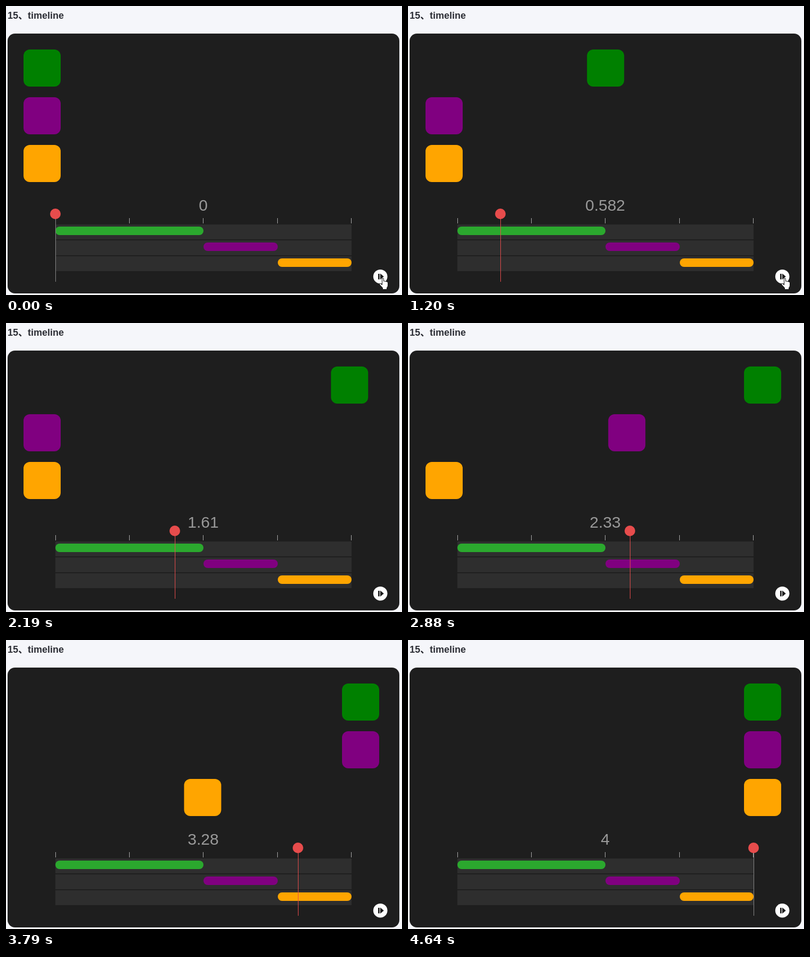
An HTML page for the animation above (4900 ms loop, 746 by 545 pixels).

```html
<!DOCTYPE html>
<html lang="en">
<head>
<meta charset="utf-8">
<title>timeline</title>
<style>
  html, body { margin: 0; width: 100%; height: 100%; overflow: hidden; background: #f5f6fa; }
  svg { display: block; }
  text { font-family: "Liberation Sans", Arial, "Noto Sans CJK SC", "Noto Sans CJK", sans-serif; }
  .title { font-size: 18px; font-weight: bold; fill: #2c2e35; }
  .count { font-size: 30px; fill: #999; text-anchor: middle; }
</style>
</head>
<body>
<svg width="746" height="545" viewBox="0 0 746 545">
  <rect width="746" height="545" fill="#f5f6fa"/>
  <text class="title" x="3" y="24">15、timeline</text>
  <rect x="3" y="52" width="738" height="490" rx="14" fill="#1e1e1e"/>
  <g id="tracks"></g>
  <g id="boxes"></g>
  <text class="count" id="count" x="371.5" y="386">0</text>
  <g id="head">
    <rect id="line" y="392" width="1" height="128"/>
    <circle cy="392" r="10" fill="#e74c4c"/>
  </g>
  <g>
    <circle cx="705.2" cy="510.2" r="13.3" fill="#fff"/>
    <path d="M701 505h2.800v10.500H701zM705 504.600l6.800 5.600-6.800 5.700z" fill="#1e1e1e"/>
  </g>
  <g id="hand">
    <path transform="translate(703 513)" fill="#fff" stroke="#111" stroke-linejoin="round"
      d="M5.500 13V2Q5.500 .5 7 .5T8.500 2V6q1.500-1 3 .5 1.500-.7 3 .6 2-.4 2 1.900V14q0 2-2 4.500V21.500H6.500V18.500L1 12.500q-1-2 .5-2.500 1.500 0 4 3z"/>
  </g>
</svg>
<script>
const LOOP = 4900;
const PLAY_AT = 643, RATE = 1.0425 / 1000;  // timeline seconds per ms
const LEAD = 0.014;                         // boxes run one tick ahead of the playhead
const START_X = 93, UNIT = 139.5, TRAVEL = 600, TOTAL = 4;
const TWEENS = [
  { color: "#008000", bar: "#2ba82e", start: 0, length: 2 },
  { color: "#800080", bar: "#800080", start: 2, length: 1 },
  { color: "#ffa500", bar: "#ffa500", start: 3, length: 1 },
];

const byId = id => document.getElementById(id);
const count = byId("count"), head = byId("head"), line = byId("line"), hand = byId("hand");

const clamp = (v, max) => Math.min(max, Math.max(0, v));
const easeOut = p => 1 - (1 - p) ** 2;
const trackX = time => Math.round(START_X + time * UNIT);
const move = (el, x, y = 0) => el.setAttribute("transform", `translate(${x} ${y})`);

function rect(parent, x, y, width, height, fill, rx = 0) {
  const el = document.createElementNS("http://www.w3.org/2000/svg", "rect");
  for (const [k, v] of Object.entries({ x, y, width, height, fill, rx })) el.setAttribute(k, v);
  return parent.appendChild(el);
}

const tracks = byId("tracks");
for (let i = 0; i <= TOTAL; i++) {
  rect(tracks, Math.round(START_X - 0.1 + i * (UNIT - 1 / TOTAL)), 400, 1, 10, "#aaa");
}
const boxes = TWEENS.map(({ color, bar, start, length }, i) => {
  const y = 412 + 30 * i, x = trackX(start);
  rect(tracks, START_X, y, TOTAL * UNIT, 28, "#2e2e2e");
  rect(tracks, x, y + 4, trackX(start + length) - x, 16, bar, 8);
  return rect(byId("boxes"), 33, 82 + 90 * i, 70, 70, color, 12);
});

function draw(ms) {
  const time = clamp((ms - PLAY_AT) * RATE, TOTAL);
  const playing = time > 0 && time < TOTAL;
  TWEENS.forEach(({ start, length }, i) => {
    const lead = playing ? LEAD : 0;
    move(boxes[i], TRAVEL * easeOut(clamp((time + lead - start) / length, 1)));
  });
  move(head, Math.floor(START_X + time * UNIT));
  line.setAttribute("fill", playing ? "#e74c4c" : "#888");
  count.textContent = playing ? time.toPrecision(3) : time;
  // the pointer leaves through the bottom edge
  move(hand, 0, Math.max(0, ms - 1200) * 0.12);
}

const begin = performance.now();
function tick() {
  draw((performance.now() - begin) % LOOP);
  requestAnimationFrame(tick);
}
tick();
</script>
</body>
</html>
```
